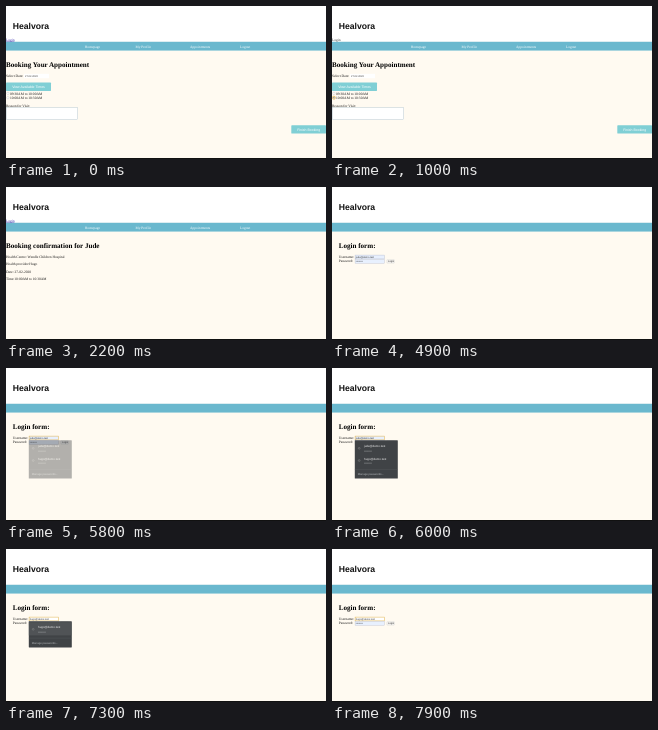
Recreate the animation shown at these times as an HTML page. Size 320x153 px, loop 8 s.

```html
<!DOCTYPE html>
<html lang="en">
<head>
<meta charset="utf-8">
<title>Clinic booking</title>
<style>
  html, body { margin: 0; width: 100%; height: 100%; overflow: hidden; background: #fffaf1; }
  svg { display: block; width: 100%; height: 100%; }
  text { font: 3.55px "Liberation Serif", serif; fill: #151515; text-rendering: geometricPrecision; white-space: pre; }
  .h1 { font-size: 7.1px; font-weight: bold; fill: #000; }
  .brand { font: bold 8.65px "Liberation Sans", sans-serif; fill: #111; }
  .nav { fill: #fff; }
  .btn { font: 3.5px "Liberation Sans", sans-serif; fill: #fff; text-anchor: middle; }
  .field { font: 2.5px "Liberation Sans", sans-serif; fill: #333; }
  .item { font: 2.95px "Liberation Sans", sans-serif; fill: #f1f1f1; }
  .dim { font: 2.75px "Liberation Sans", sans-serif; fill: #b4b7ba; }
  .link { fill: #3326a8; text-decoration: underline; }
</style>
</head>
<body>
<svg id="stage" viewBox="0 0 320 153" preserveAspectRatio="none"></svg>
<script>
const LOOP = 8000;
const stage = document.getElementById('stage');

function add(parent, tag, attrs = {}) {
  const node = document.createElementNS('http://www.w3.org/2000/svg', tag);
  for (const key in attrs) node.setAttribute(key, attrs[key]);
  parent.appendChild(node);
  return node;
}
const group = parent => add(parent, 'g');
const rect = (parent, x, y, width, height, fill, more) =>
  add(parent, 'rect', { x, y, width, height, fill, ...more });
function label(parent, x, y, str, cls = '') {
  const node = add(parent, 'text', { x, y, class: cls });
  node.textContent = str;
  return node;
}
function button(parent, x, y, w, h, str) {
  rect(parent, x, y, w, h, '#80cfd5', { rx: 0.6 });
  label(parent, x + w / 2, y + h / 2 + 1.2, str, 'btn');
}
function radio(parent, y) {
  return add(parent, 'circle', { cx: 1.9, cy: y, r: 1.2, fill: '#fff', stroke: '#aaa', 'stroke-width': 0.3 });
}
const show = (node, on) => { node.style.opacity = +on; };

// Shared page frame
rect(stage, 0, 0, 320, 153, '#fffaf1');
rect(stage, 0, 0, 320, 36, '#fff');
rect(stage, 0, 35.5, 320, 9.3, '#b9dbe3');
rect(stage, 0, 36, 320, 8.3, '#6ab8ce');
rect(stage, 0, 152, 320, 1, '#111');
label(stage, 6.7, 23.2, 'Healvora', 'brand');

const nav = group(stage);
const link = label(nav, 0, 34.6, 'Login', 'link');
[['Homepage', 78.8], ['My Profile', 129.5], ['Appointments', 184], ['Logout', 234]]
  .forEach(([str, x]) => label(nav, x, 41.6, str, 'nav'));

// Booking page
const booking = group(stage);
label(booking, 0, 61.3, 'Booking Your Appointment', 'h1');
label(booking, 0, 71, 'Select Date:');
rect(booking, 18, 67.9, 25, 4.3, '#fff');
label(booking, 19, 71, '27-02-2020', 'field');
button(booking, 0, 76.6, 45, 8.3, 'View Available Times');
radio(booking, 87.4);
radio(booking, 91.7);
label(booking, 4, 88.6, '09:30AM to 10:00AM');
label(booking, 4, 92.9, '10:00AM to 10:30AM');
const chosen = group(booking);
add(chosen, 'circle', { cx: 1.9, cy: 91.7, r: 1.5, fill: '#fff', stroke: '#e2b23f', 'stroke-width': 0.7 });
add(chosen, 'circle', { cx: 1.9, cy: 91.7, r: 0.7, fill: '#777' });
label(booking, 0, 100.6, 'Reason for Visit:');
rect(booking, 0.25, 101.5, 71.5, 12.2, '#fff', { stroke: '#a9bcc5', 'stroke-width': 0.4 });
button(booking, 285.3, 119.3, 34.7, 8.3, 'Finish Booking');

// Confirmation page
const confirmed = group(stage);
label(confirmed, 0, 61.3, 'Booking confirmation for Jude', 'h1');
['Health Centre: Wendle Children Hospital', 'Health provider:Hugo', 'Date: 27-02-2020', 'Time:10:00AM to 10:30AM']
  .forEach((str, i) => label(confirmed, 0, 71 + i * 7.45, str));

// Login page
const login = group(stage);
label(login, 6.7, 61.3, 'Login form:', 'h1');
label(login, 6.7, 71.1, 'Username:');
label(login, 6.7, 75.4, 'Password:');
const userBox = rect(login, 23.1, 68.1, 29.2, 3.8, '#e8f0fe', { 'stroke-width': 0.45 });
rect(login, 23.1, 72.5, 29.2, 3.7, '#e8f0fe', { stroke: '#b9bfd0', 'stroke-width': 0.4 });
const user = label(login, 23.8, 70.9, '', 'field');
label(login, 23.8, 75.3, '••••••••', 'field');
rect(login, 54.8, 72.6, 7.6, 3.6, '#f3f1ee', { stroke: '#ccc', 'stroke-width': 0.3, rx: 0.5 });
label(login, 56, 75.2, 'Login', 'field');
const caret = rect(login, 42.5, 69, 0.4, 2.4, '#222');

const JUDE = 'jude@demo.test', HUGO = 'hugo@demo.test', REST = '@demo.test';

function menu(names) {
  const g = group(login);
  const gap = 12.2, end = 86.1 + gap * (names.length - 1);
  rect(g, 22.8, 72.3, 43, end + 12.3 - 72.3, '#404346', { rx: 0.4 });
  const hover = rect(g, 22.8, 73.2, 43, 13.2, '#5b5e61');
  names.forEach((name, i) => {
    const y = 79.4 + i * gap;
    add(g, 'circle', { cx: 27.2, cy: y + 0.9, r: 0.9, fill: 'none', stroke: '#999', 'stroke-width': 0.4 });
    label(g, 32, y, name, 'item');
    label(g, 32, y + 4.2, '••••••••', 'dim');
  });
  rect(g, 22.8, end + 2.8, 43, 0.3, '#5d6063');
  label(g, 25.8, end + 8.5, 'Manage passwords...', 'dim');
  return { g, hover };
}
const full = menu([JUDE, HUGO]);
const single = menu([HUGO]);
show(full.hover, false);

// [time, user name, focused, full menu, single menu, highlighted]
const STEPS = [
  [4900, JUDE, 0, 0, 0, 0],
  [5800, JUDE, 1, 0.4, 0, 0],
  [5900, JUDE, 1, 0.8, 0, 0],
  [6000, JUDE, 1, 1, 0, 0],
  [6600, REST, 1, 0, 0, 0],
  [6700, REST, 1, 0, 0.6, 0],
  [6800, REST, 1, 0, 1, 0],
  [7300, HUGO, 1, 0, 1, 0.6],
  [7400, HUGO, 1, 0, 1, 1],
  [7700, HUGO, 1, 0, 0, 0]
];

function draw(t) {
  show(nav, t < 4900);
  show(booking, t < 1700);
  show(confirmed, t >= 1700 && t < 4900);
  show(login, t >= 4900);
  show(chosen, t >= 800);
  link.style.fill = t >= 1000 && t < 1700 ? '#333' : '';
  link.style.textDecoration = t >= 1000 && t < 1700 ? 'none' : '';

  const [, name, focus, fullOn, singleOn, lit] = STEPS.filter(s => s[0] <= t).pop() || STEPS[0];
  user.textContent = name;
  userBox.setAttribute('stroke', focus ? '#dca936' : '#b9bfd0');
  userBox.setAttribute('fill', focus && name !== JUDE ? '#fff' : '#e8f0fe');
  show(full.g, fullOn);
  show(single.g, singleOn);
  show(single.hover, lit);
  show(caret, t >= 7700 && t < 7900);
}

const start = performance.now();
function tick() {
  draw((performance.now() - start) % LOOP);
  requestAnimationFrame(tick);
}
draw(0);
requestAnimationFrame(tick);
</script>
</body>
</html>
```
